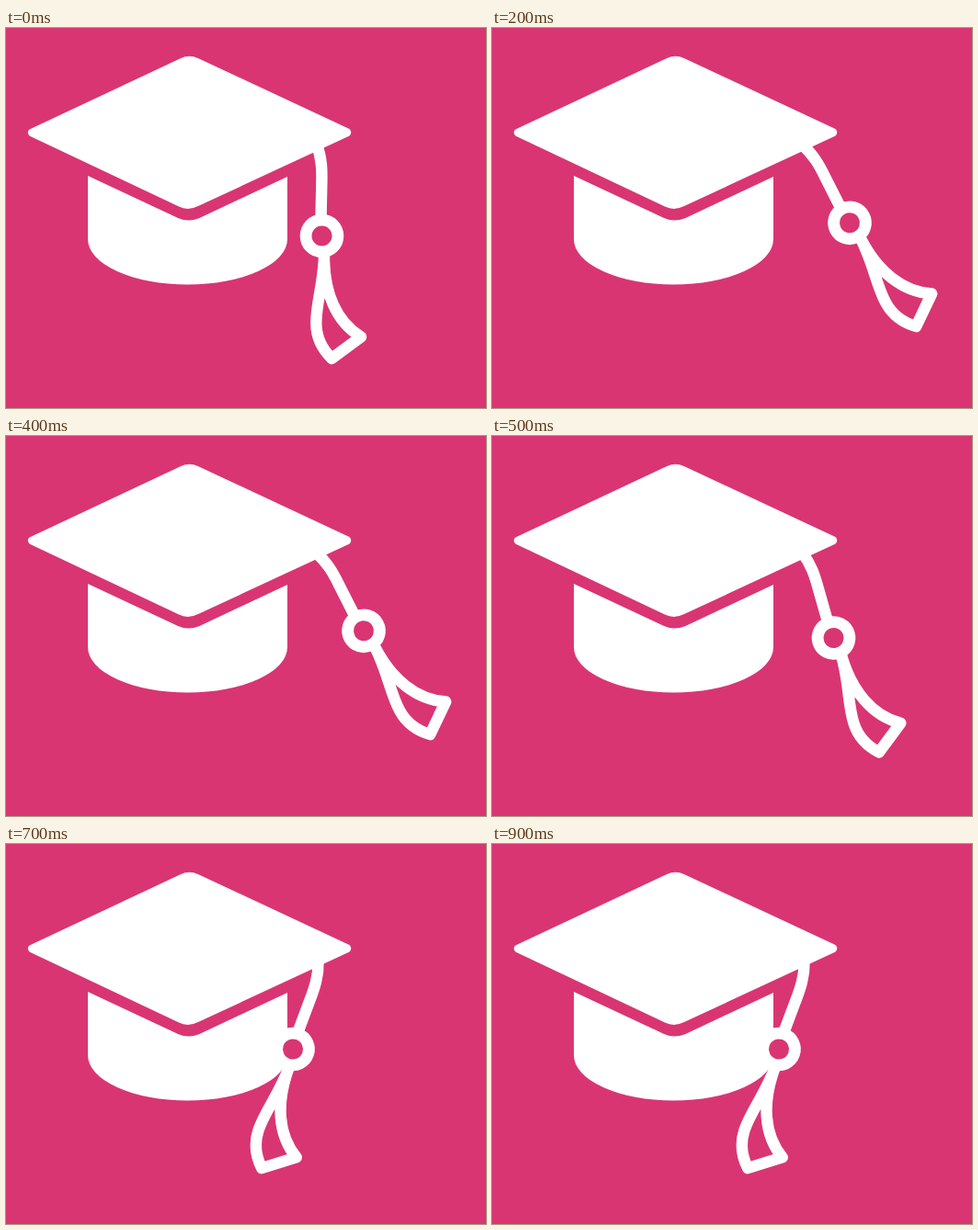
An HTML page for the animation above (1 s loop, 522 by 414 pixels).

```html
<!DOCTYPE html>
<html lang="en">
<head>
<meta charset="utf-8">
<title>Graduation cap</title>
<style>
  html, body { margin: 0; width: 100%; height: 100%; overflow: hidden; background: #d93573; }
  svg { display: block; width: 100%; height: 100%; }
  #tassel { stroke: #fff; stroke-width: 12.4; stroke-linejoin: round; }
</style>
</head>
<body>
<svg viewBox="0 0 522 414">
  <g fill="#fff">
    <path d="M190 33Q199.5 28.5 209 33L373.5 110Q377 113.5 373.5 117.5L209 194Q198 199.5 188 194.5L25.5 117.5Q22 113.5 25.5 110.5Z"/>
    <path d="M89 161L187 207Q198 212 210 207.3L306 162V230A108.5 49.5 0 0 1 89 230Z"/>
  </g>
  <!-- drawn around the centre of the bead -->
  <g id="tassel" fill="#d93573">
    <path fill="none" d="M-5.5 -99C.2 -84 .2 -70 -.2 -56L-1 -18"/>
    <path d="M2.5 21.5C2 51.5 -6.5 73.5 -6.2 95.5C-6 111.5 1.5 124.5 10.8 133.5L42.5 110C15.5 93.5 2 61.5 2.5 21.5Z"/>
    <circle r="17.4" stroke-width="12.8"/>
  </g>
</svg>
<script>
  const STEP = 100;
  // bead x, bead y, swing angle in degrees
  const rest = [343.5, 226.5, 0];
  const right = [[371.5, 220, -17], [389, 212.3, -28], [403.5, 202, -38]];
  const left = [[312, 223.5, 19.3], [282.4, 210.2, 38]];
  const swing = side => [...side, ...side.slice(0, -1).reverse()];
  const poses = [rest, ...swing(right), rest, ...swing(left)];
  const tassel = document.getElementById('tassel');
  const start = performance.now();

  function draw(now) {
    const i = Math.floor(Math.max(0, now - start) / STEP) % poses.length;
    const [x, y, angle] = poses[i];
    tassel.setAttribute('transform', `translate(${x} ${y}) rotate(${angle})`);
    requestAnimationFrame(draw);
  }
  draw(start);
</script>
</body>
</html>
```
